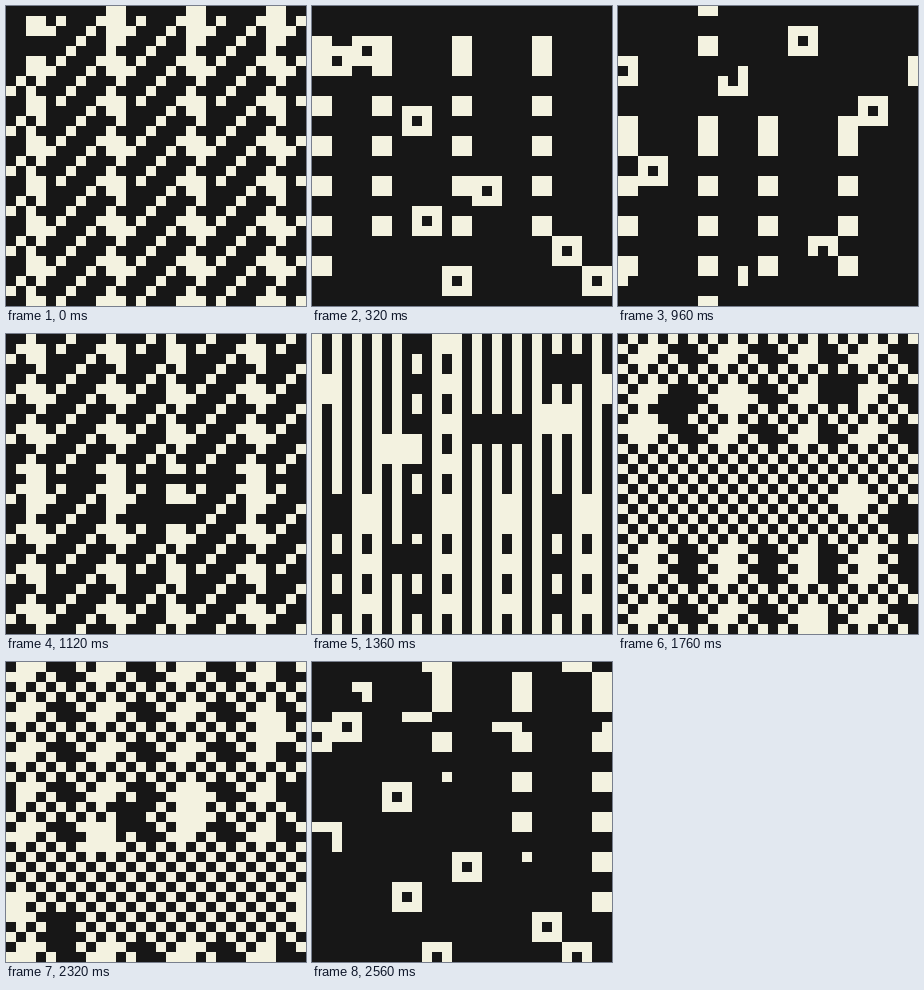
Recreate the animation shown at these times as an HTML page. Size 300 px wide and 300 px high, loop 2.64 s.

```html
<!DOCTYPE html>
<html lang="en">
<head>
<meta charset="utf-8">
<title>Cell patterns</title>
<style>
html, body { margin: 0; width: 100%; height: 100%; overflow: hidden; background: #171717; }
svg { display: block; width: 100vw; height: 100vh; }
</style>
</head>
<body>
<svg viewBox="0 0 30 30" shape-rendering="crispEdges">
  <rect width="30" height="30" fill="#171717"/>
  <path id="cells" fill="#f3f2e0"/>
</svg>
<script>
const N = 30, STEP = 80, COUNT = 33, CYCLE = 7;
const LANES = [0, 8, 16, 24];
const path = document.getElementById('cells');
const grid = new Uint8Array(N * N);
let step = 0, cycle = 0;

// Coordinates ride on a torus that drifts one cell right and down per step.
const wrap = v => ((v % N) + N) % N;
const set = (x, y, v) => { grid[wrap(y + step + 1) * N + wrap(x + step + 2)] = v; };

function box(v, x, y, w, h) {
  for (let j = 0; j < h; j++)
    for (let i = 0; i < w; i++) set(x + i, y + j, v);
}

function fill(rule) {
  for (let y = 0; y < N; y++)
    for (let x = 0; x < N; x++) set(x, y, rule(x, y) ? 1 : 0);
}

// A lane of 2x2 blocks, four rows apart, doubled where the torus closes.
function lane(v, x, count) {
  if (count > 0) box(v, x, -2, 2, 2);
  for (let k = 0; k < count; k++) box(v, x, 4 * k, 2, 2);
}

// Loose shapes slip down one more row in every cycle.
const blobs = (v, w, h, points) =>
  points.forEach(([x, y]) => box(v, x, y + cycle, w, h));

// A ring grows clockwise around its hole, three cells per cycle.
const EDGE = [[0, 0], [1, 0], [2, 0], [2, 1], [2, 2], [1, 2], [0, 2], [0, 1]];
function ring([x, y, start = 0, grown = 8]) {
  const len = Math.min(8, grown + 3 * cycle);
  for (let i = 0; i < len; i++) {
    const [dx, dy] = EDGE[(start + i) % 8];
    set(x + dx, y + cycle + dy, 1);
  }
  if (len === 8) set(x + 1, y + cycle + 1, 0);
}

function diagonals() {
  fill((x, y) => (x + y) % 4 === 3);
  for (const x of LANES) {
    box(0, x + 2, -1, 6, 1);
    for (const y of [2, 9, 17, 26]) box(0, x + 2, y, 2, 2);
    lane(1, x, 8);
    if (x) box(1, x, -1, 2, 4);
  }
  box(0, -2, 2, 5, 2);
}

function checks() {
  fill((x, y) => (x + y) % 2 === 0);
  for (const x of LANES) {
    lane(1, x, 5);
    lane(0, x - 4, 5);
  }
  blobs(0, 3, 3, [[3, 21], [10, 10], [27, 8]]);
  blobs(1, 3, 3, [[28, 19], [24, 1], [7, 12], [16, 9]]);
}

function stripes() {
  fill((x, y) => {
    const c = x < 28 ? x % 8 : x - 22;
    const dashed = y < 12 || y > 27 || (x > 20 && x < 27);
    const dash = y % 4 > 1;
    if (c === 0) return dashed && !dash;
    if (c === 5) return !dashed || dash;
    return c % 2;
  });
  blobs(1, 5, 3, [[17, 20], [3, 17], [9, 14]]);
  blobs(0, 5, 3, [[27, 18], [4, 12], [18, 1]]);
}

function sparse(rings) {
  fill(() => 0);
  const least = Math.floor(5.5 - 1.5 * cycle);
  LANES.forEach((x, k) => lane(1, x, Math.max(2 * k, least)));
  rings.forEach(ring);
}

const earlyRings = [[28, 28], [25, 29], [3, 5], [10, 12], [4, 15], [18, 18],
  [7, 21], [21, 21], [26, 9, 0, -7], [5, 28, 0, -9], [14, 29, 0, -9],
  [29, 25, 1, -9], [9, 4, 0, -11], [17, 12, 0, -11]];
const lateRings = [[3, 18], [15, 21], [10, 25], [18, 1], [26, 22, 2, 3],
  [5, 9, 7, 2], [28, 11, 6, -1], [14, 12, 3, -2], [7, 4, 3, -3], [25, 12, 3, -5]];

const phases = [diagonals, checks, checks, stripes,
  () => sparse(earlyRings), () => sparse(lateRings), diagonals];

function render(n) {
  step = n;
  cycle = Math.floor(n / CYCLE);
  phases[n % CYCLE]();
  let d = '';
  for (let y = 0; y < N; y++)
    for (let x = 0; x < N; x++) {
      if (!grid[y * N + x]) continue;
      const from = x;
      while (x < N && grid[y * N + x]) x++;
      d += `M${from} ${y}H${x}v1H${from}z`;
    }
  path.setAttribute('d', d);
}

let shown = -1;
function tick(now) {
  const n = Math.floor(now / STEP) % COUNT;
  if (n !== shown) render(shown = n);
  requestAnimationFrame(tick);
}
render(0);
requestAnimationFrame(tick);
</script>
</body>
</html>
```
